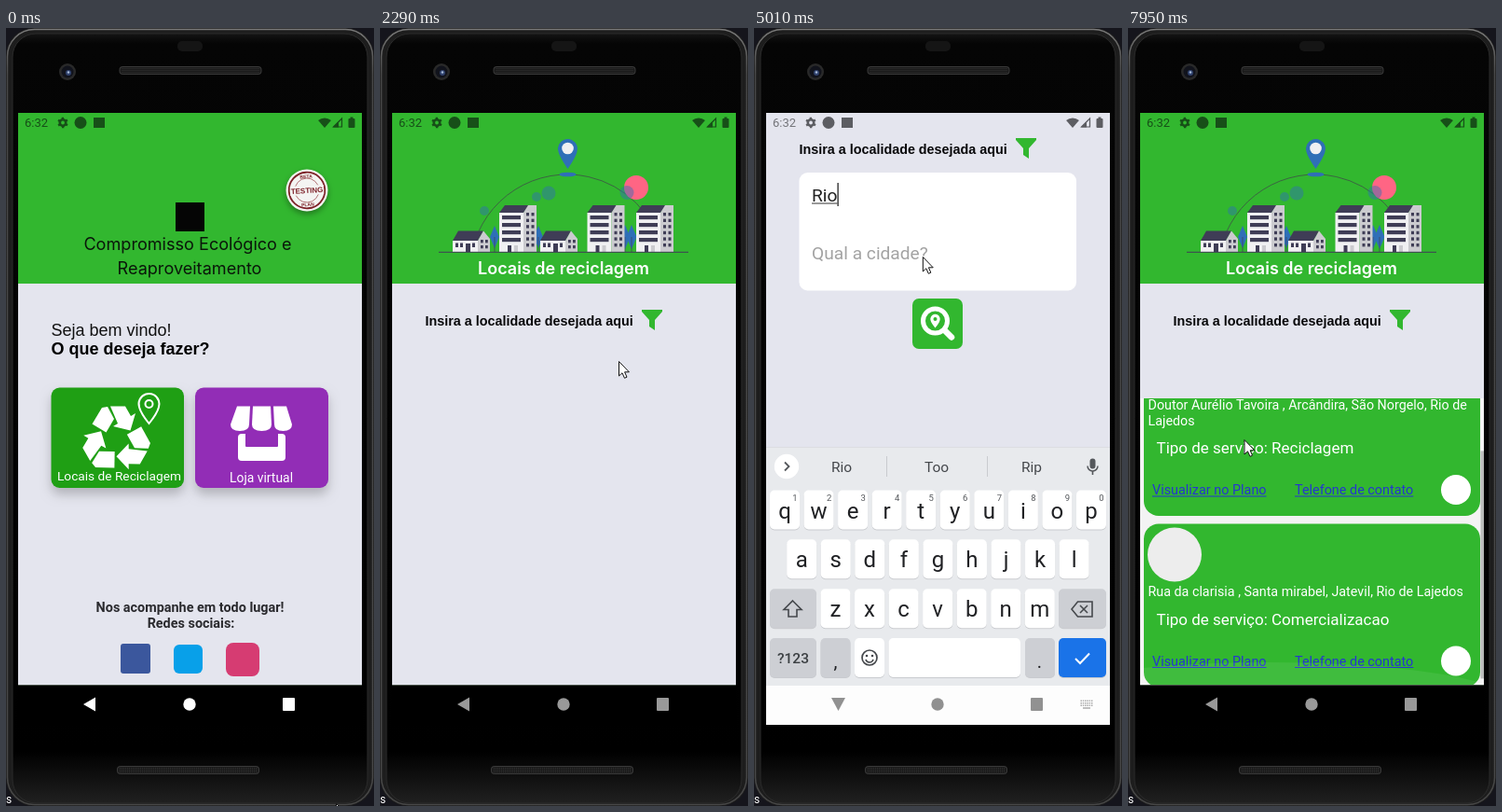
Animation of 395x834 px, one loop 8000 ms. Source, as an HTML page with a canvas:

```html
<!DOCTYPE html>
<html lang="pt">
<head>
<meta charset="utf-8">
<title>Aplicativo de reciclagem</title>
<style>
html, body { margin: 0; width: 100%; height: 100%; overflow: hidden; background: #14141a; }
canvas { display: block; width: 395px; height: 834px; }
</style>
</head>
<body>
<canvas id="stage"></canvas>
<script>
const W = 395, H = 834, LOOP = 8000;
const canvas = document.getElementById('stage');
const dpr = window.devicePixelRatio || 1;
canvas.width = W * dpr;
canvas.height = H * dpr;
const c = canvas.getContext('2d');

const GREEN = '#32b72f', PAGE = '#e4e5ee', DARK = '#3f3d56', BLUE = '#2f6fb7';
const SCREEN = { x: 13, y: 91, w: 369, h: 613 };
const ROBOTO = 'Roboto, sans-serif', ARIMO = '"Liberation Sans", Arial, sans-serif', INTER = 'Inter, sans-serif';

const clamp = (v, a = 0, b = 1) => Math.min(b, Math.max(a, v));
const mix = (a, b, p) => a + (b - a) * p;
const part = (t, a, b) => clamp((t - a) / (b - a));
const easeOut = p => 1 - (1 - p) ** 2;
const easeInOut = p => p * p * (3 - 2 * p);

// y of a cubic bezier easing at the given x
function bezier(x, x1, y1, x2, y2) {
  const at = (s, a, b) => 3 * (1 - s) ** 2 * s * a + 3 * (1 - s) * s * s * b + s ** 3;
  let lo = 0, hi = 1;
  for (let i = 0; i < 24; i++) {
    const mid = (lo + hi) / 2;
    if (at(mid, x1, x2) < x) lo = mid; else hi = mid;
  }
  return at(lo, y1, y2);
}

function rect(x, y, w, h, fill, r = 0) {
  c.fillStyle = fill;
  c.beginPath();
  c.roundRect(x, y, w, h, r);
  c.fill();
}
function disc(x, y, r, fill, ry = r) {
  c.fillStyle = fill;
  c.beginPath();
  c.ellipse(x, y, r, ry, 0, 0, 7);
  c.fill();
}
function ring(x, y, r, color, width) {
  c.strokeStyle = color;
  c.lineWidth = width;
  c.beginPath();
  c.arc(x, y, r, 0, 7);
  c.stroke();
}
function trace(points, close) {
  c.beginPath();
  for (let i = 0; i < points.length; i += 2) c.lineTo(points[i], points[i + 1]);
  if (close) c.closePath();
}
function poly(points, fill) {
  trace(points, true);
  c.fillStyle = fill;
  c.fill();
}
function line(points, color, width, close = false) {
  trace(points, close);
  c.strokeStyle = color;
  c.lineWidth = width;
  c.stroke();
}
function text(s, x, y, font, color, align = 'left') {
  c.font = font;
  c.fillStyle = color;
  c.textAlign = align;
  c.fillText(s, x, y);
}
function group(draw) {
  c.save();
  draw();
  c.restore();
}
function clip(x, y, w, h) {
  c.beginPath();
  c.rect(x, y, w, h);
  c.clip();
}
function shadow(color, blur, dy) {
  c.shadowColor = color;
  c.shadowBlur = blur * dpr;
  c.shadowOffsetY = dy * dpr;
}

// Opacity of a pressed button: fades down, then back up
const press = (t, start, mid, end) =>
  t < start ? 1 : t < mid ? mix(1, 0.3, part(t, start, mid)) : mix(0.3, 1, part(t, mid, end));

function speaker(x, y) {
  rect(x, y, 153, 9, '#3a3a3a', 4);
  rect(x + 1, y + 1, 151, 7, '#1a1a1a', 3);
  c.setLineDash([1, 1]);
  for (let i = 2; i < 8; i += 2) line([x + 3, y + i + 0.5, x + 150, y + i + 0.5], '#343434', 1);
  c.setLineDash([]);
}

function phone() {
  rect(0, 0, W, H, '#15151c');
  rect(0, 0, W, H, '#1d1d1d', 30);
  const rim = c.createLinearGradient(0, 0, 0, H);
  rim.addColorStop(0, '#7c7c7c');
  rim.addColorStop(0.06, '#474747');
  rim.addColorStop(1, '#474747');
  c.strokeStyle = rim;
  c.lineWidth = 1.5;
  c.beginPath();
  c.roundRect(1.5, 1.5, W - 3, H - 3, 29);
  c.stroke();
  const body = c.createLinearGradient(0, 0, 0, H);
  body.addColorStop(0, '#1c1c1c');
  body.addColorStop(0.02, '#050505');
  body.addColorStop(0.93, '#000');
  body.addColorStop(1, '#222');
  rect(7, 6, W - 14, H - 9, body, 25);
  c.strokeStyle = '#2b2b2b';
  c.lineWidth = 1;
  c.stroke();
  rect(184, 14, 27, 11, '#151515', 5);
  speaker(121.5, 41);
  speaker(119, 791);
  disc(66, 47, 9, '#292929');
  disc(66, 47, 6.5, '#11131c');
  disc(67, 48, 3, '#31436e');
  disc(67, 47.5, 1.2, '#a9bddb');
  text('s', 0, 831, '12px ' + ROBOTO, '#fff');
  rect(SCREEN.x, SCREEN.y, SCREEN.w, 656, '#000');
  rect(SCREEN.x, SCREEN.y + SCREEN.h, SCREEN.w, 1, '#465046');
}

function statusBar(light) {
  const ink = light ? '#5c5d62' : '#174f18';
  text('6:32', 20, 106, '13px ' + ROBOTO, light ? '#74757a' : ink);
  ring(61, 101.5, 3.2, ink, 2.6);
  for (let i = 0; i < 6; i++) {
    const a = i * Math.PI / 3 + 0.5, x = Math.cos(a), y = Math.sin(a);
    line([61 + x * 3.5, 101.5 + y * 3.5, 61 + x * 5.7, 101.5 + y * 5.7], ink, 2.4);
  }
  disc(80, 101.5, 6.5, ink);
  rect(94, 96, 12, 11, ink);
  c.fillStyle = ink;
  c.beginPath();
  c.moveTo(342, 107);
  c.arc(342, 107, 10.5, -Math.PI * 0.73, -Math.PI * 0.27);
  c.fill();
  line([351.5, 106, 360.5, 97, 360.5, 106], ink, 1.2, true);
  poly([351, 106.5, 357, 100.5, 357, 106.5], ink);
  rect(367.5, 97, 7, 10, ink, 1);
  rect(369.5, 95.5, 3, 2, ink);
}

function navBar(t, keys) {
  const level = Math.round(keys ? 145 : mix(255, 153, easeOut(part(t, 1290, 1900))));
  const ink = `rgb(${level},${level},${level})`;
  if (keys) rect(13, 705, 369, 42, '#fdfdfd');
  if (keys && t > 4010) poly([83, 718, 98, 718, 90.5, 732], ink);
  else poly([83, 725, 96, 717.5, 96, 732.5], ink);
  disc(197, 725, 6.7, ink);
  rect(297, 718, 13, 14, ink, 1);
  if (t >= 3550 && t < 6560) {
    for (let y = 0; y < 3; y++)
      for (let x = 0; x < 6; x++) rect(350.5 + x * 2.3, 720.5 + y * 2.5, 1.4, 1.4, '#a5a5a5');
    rect(353, 728.3, 8, 1.4, '#a5a5a5');
  }
}

function recycle(x, y) {
  group(() => {
    c.translate(x, y);
    for (let i = 0; i < 3; i++) {
      poly([-25.5, -16.6, -15, -34, -9, -35, -2, -22, -10.5, -7.6], '#fff');
      poly([-6, -35.5, 10, -35.5, 16, -25, 21, -28, 15.5, -9.5, -3, -14, 2, -17], '#fff');
      c.rotate(Math.PI * 2 / 3);
    }
  });
}

// Map pin: head centre, head radius, distance to the tip
function pinPath(x, y, r, tip) {
  c.beginPath();
  c.arc(x, y, r, Math.PI * 0.9, Math.PI * 0.1);
  c.quadraticCurveTo(x + r * 0.8, y + r * 0.9, x, y + tip);
  c.quadraticCurveTo(x - r * 0.8, y + r * 0.9, x - r * 0.95, y + r * 0.31);
  c.closePath();
}

function shop() {
  for (const [a, b, d, e] of [[248, 262, 241, 261], [265, 284, 264, 285], [287, 301, 288, 307]]) {
    c.fillStyle = '#fff';
    c.beginPath();
    c.moveTo(a, 405.5);
    c.lineTo(b, 405.5);
    c.lineTo(e, 425);
    c.quadraticCurveTo(e, 432, (d + e) / 2, 432);
    c.quadraticCurveTo(d, 432, d, 425);
    c.fill();
  }
  rect(249, 435, 51, 29, '#fff', 4);
  rect(257, 433, 35, 16, '#922db6', 1);
}

function stamp() {
  group(() => {
    shadow('rgba(0,0,0,.35)', 6, 3);
    disc(323, 174, 22.5, '#f4f4f2');
  });
  group(() => {
    c.translate(323, 174);
    c.rotate(-0.06);
    const ink = '#7d2128';
    ring(0, 0, 19.3, ink, 1.8);
    ring(0, 0, 13, '#a4585c', 0.8);
    rect(-18, -5, 36, 10, '#f4f4f2');
    text('TESTING', 0, 3, 'bold 8px ' + ARIMO, ink, 'center');
    text('BETA', 0, -13, 'bold 5px ' + ARIMO, ink, 'center');
    text('PLAN', 0, 17, 'bold 5px ' + ARIMO, ink, 'center');
  });
}

function homeScreen(t) {
  const title = '18.1px ' + INTER;
  rect(13, 91, 369, 640, PAGE);
  rect(13, 80, 369, 194, GREEN);
  rect(182, 187, 31, 31, '#050505');
  text('Compromisso Ecológico e', 195, 238, title, '#0a160a', 'center');
  text('Reaproveitamento', 197, 263.5, title, '#0a160a', 'center');
  stamp();
  text('Seja bem vindo!', 48.5, 330, '18px ' + ARIMO, '#111');
  text('O que deseja fazer?', 48.5, 350, 'bold 18px ' + ARIMO, '#000');

  group(() => {
    c.globalAlpha = press(t, 990, 1140, 1370);
    group(() => {
      shadow('rgba(0,0,0,.22)', 12, 7);
      rect(48.5, 385.5, 142.5, 107.5, '#1f9f14', 9);
    });
    recycle(118, 441);
    pinPath(153.5, 403, 11, 21);
    c.fillStyle = '#1f9f14';
    c.fill();
    c.strokeStyle = '#fff';
    c.lineWidth = 2;
    c.stroke();
    ring(153.5, 403, 4, '#fff', 2);
    text('Locais de Reciclagem', 121.5, 485, '13.7px ' + ROBOTO, '#fff', 'center');
  });
  group(() => {
    shadow('rgba(0,0,0,.22)', 12, 7);
    rect(203, 385.5, 143, 107.5, '#922db6', 9);
  });
  shop();
  text('Loja virtual', 274, 487, '13.9px ' + ROBOTO, '#fff', 'center');

  text('Nos acompanhe em todo lugar!', 197.5, 625.5, 'bold 14.4px ' + ROBOTO, '#2a2a2e', 'center');
  text('Redes sociais:', 198.5, 642.5, 'bold 14.4px ' + ROBOTO, '#2a2a2e', 'center');
  rect(123, 660, 32, 32, '#3b579d', 3);
  rect(180, 661, 31, 31, '#08a0e9', 6);
  rect(236, 659, 36, 36, '#d63c72', 8);
}

function tower(x) {
  poly([x, 198, x + 6, 190, x + 32, 190, x + 26, 198], DARK);
  rect(x, 198, 26, 42, '#f0f0f2');
  poly([x + 26, 198, x + 31, 190, x + 40, 190, x + 40, 240, x + 26, 240], '#cbcbcf');
  for (let i = 0; i < 4; i++) rect(x + 3, 201 + i * 8, 20, 4.2, DARK);
  rect(x + 9, 233, 4, 7, DARK);
  rect(x + 16, 233, 4, 7, '#cbcbcf');
  for (let i = 0; i < 6; i++)
    for (const dx of [29, 34.5]) rect(x + dx, 198 + i * 6.6, 3, 3.4, DARK);
}

function house(x) {
  poly([x, 228, x + 6, 217.5, x + 33, 217.5, x + 27, 228], DARK);
  rect(x, 228, 28, 12, '#f0f0f2');
  poly([x + 27, 228, x + 33, 217.5, x + 40, 226, x + 40, 240, x + 27, 240], '#cbcbcf');
  for (const dx of [3, 8, 21]) rect(x + dx, 230.5, 3, 4.5, DARK);
  rect(x + 14, 231, 5, 9, DARK);
  for (const dx of [30, 35])
    for (const y of [227, 233]) rect(x + dx, y, 2.8, 3.3, DARK);
}

function leaf(x, w, h) {
  poly([x, 224 - h, x + w, 224, x, 224 + h, x - w, 224], BLUE);
  line([x, 224, x, 240], DARK, 0.7);
}

function cityHeader() {
  rect(13, 91, 369, 183, GREEN);
  c.strokeStyle = '#3d5c45';
  c.lineWidth = 0.9;
  c.beginPath();
  c.arc(201, 261.6, 104.6, Math.PI * 1.07, Math.PI * 1.93);
  c.stroke();
  disc(275, 171, 13, '#ff6584');
  for (const [x, y, r] of [[112, 196, 5], [168, 181, 5], [181, 177, 7.5], [265, 176.5, 7.5]])
    disc(x, y, r, 'rgba(47,111,183,.45)');
  disc(201.5, 157, 9, BLUE, 2.3);
  pinPath(201.5, 129.5, 10.5, 21.5);
  c.fillStyle = BLUE;
  c.fill();
  disc(201.5, 129, 6.3, '#f0f0f2');
  leaf(123, 5, 12);
  leaf(170, 5, 12);
  leaf(263, 5.5, 13);
  leaf(270, 5.5, 13);
  house(78);
  tower(128);
  house(172);
  tower(222.5);
  tower(275);
  line([63, 240.3, 331, 240.3], DARK, 1);
  text('Locais de reciclagem', 197, 264, '600 18px ' + INTER, '#fff', 'center');
}

function prompt(y, alpha) {
  text('Insira a localidade desejada aqui', 48.5, y + 5.5, 'bold 14.35px ' + ARIMO, '#08080a');
  group(() => {
    c.globalAlpha = alpha;
    poly([281, y - 11, 303, y - 11, 303, y - 9, 295, y, 295, y + 11, 289, y + 7, 289, y, 281, y - 9], GREEN);
  });
}

function typed(t) {
  return t < 3810 ? '' : t < 4540 ? 'R' : t < 4750 ? 'Ri' : 'Rio';
}

function caretOn(t) {
  const last = [4750, 4540, 3810, 3550].find(k => t >= k);
  return last !== undefined && Math.floor((t - last) / 503) % 2 === 0;
}

function searchForm(t) {
  const font = '19.2px ' + ROBOTO, word = typed(t);
  rect(48.5, 155, 297.5, 126.5, '#fff', 9);
  text(word || 'Qual o estado?', 62, 185.5, font, word ? '#222' : '#a3a3a3');
  const end = 62 + (word ? c.measureText(word).width : 0);
  if (word && t > 4010) rect(62, 187.5, end - 62, 1, '#333');
  if (caretOn(t)) rect(end, 166, 1.4, 25, '#333');
  text('Qual a cidade?', 62, 248, font, '#a3a3a3');

  group(() => {
    c.globalAlpha = press(t, 5710, 5830, 6010);
    rect(170, 290, 54, 54, GREEN, 7);
    ring(194.5, 314, 13, '#fff', 5);
    c.lineCap = 'round';
    line([205, 324.5, 212, 331.5], '#fff', 6.5);
    pinPath(194.5, 312, 5.2, 9.5);
    c.fillStyle = '#fff';
    c.fill();
    disc(194.5, 312, 2, GREEN);
  });
}

function key(x, y, w, fill = '#fff') {
  rect(x, y + 1, w, 42, '#c9cbcf', 5);
  rect(x, y, w, 42, fill, 5);
}

function toolbar(t) {
  const ink = '#55585c', word = typed(t), words = t > 4010;
  disc(35, 470, 13.2, '#fff');
  const s = words ? 1 : -1;
  line([35 - s * 2, 465.5, 35 + s * 2.5, 470, 35 - s * 2, 474.5], ink, 1.8);
  rect(360.5, 461.5, 6, 11, ink, 3);
  c.strokeStyle = ink;
  c.lineWidth = 1.5;
  c.beginPath();
  c.arc(363.5, 469.5, 5.5, 0, Math.PI);
  c.stroke();
  line([363.5, 475, 363.5, 479], ink, 1.6);
  if (words) {
    const options = { R: ['R', 'Rs', 'Rua'], Ri: ['Ri', 'Too', 'Rio'], Rio: ['Rio', 'Too', 'Rip'] }[word];
    options.forEach((w, i) => text(w, 94 + i * 102, 476, '15.5px ' + ROBOTO, '#44474b', 'center'));
    for (const x of [142, 250]) rect(x, 459, 1, 22, '#c9cbcf');
    return;
  }
  ring(83, 468.5, 4.6, ink, 1.8);
  line([86.5, 472, 92, 477.5], ink, 2);
  line([131, 463.5, 144, 463.5, 144, 472, 139, 477, 131, 477], ink, 1.6, true);
  line([139, 477, 139, 472, 144, 472], ink, 1.3);
  rect(134, 467, 2, 2, ink);
  rect(139, 467, 2, 2, ink);
  line([134.5, 471, 136, 472.5, 138, 472], ink, 1.2);
  text('GIF', 190, 474, 'bold 11.5px ' + ROBOTO, ink, 'center');
  line([238, 464, 251, 464, 251, 478, 238, 478], ink, 1.6, true);
  rect(241, 462, 7, 4, ink);
  for (const y of [469, 472, 475]) line([241, y, 248, y], ink, 1.1);
  rect(276.5, 459, 1, 22, '#d0d2d6');
  for (const x of [304, 310, 316]) disc(x, 470.5, 1.6, ink);
}

function keyboard(t) {
  const upper = t <= 4010, ink = '#202124', grey = '#cdcfd4', step = 36.55;
  rect(13, 449, 369, 256, '#e8eaed');
  rect(13, 449, 369, 1, '#dcdde2');
  toolbar(t);
  const rows = [['qwertyuiop', 17, 495.5], ['asdfghjkl', 35.2, 548.3], ['zxcvbnm', 71.5, 601.2]];
  rows.forEach(([letters, x0, y], row) => [...letters].forEach((ch, i) => {
    const x = x0 + i * step;
    key(x, y, 32);
    text(upper ? ch.toUpperCase() : ch, x + 16, y + 30, '24px ' + ROBOTO, ink, 'center');
    if (row === 0) text((i + 1) % 10, x + 27, y + 11, '9.5px ' + ROBOTO, '#55585c', 'center');
  }));

  key(17, 601.2, 50, grey);
  const arrow = [41.5, 614, 51, 623.5, 46, 623.5, 46, 631, 37, 631, 37, 623.5, 32, 623.5];
  if (upper) poly(arrow, '#45484c');
  else line(arrow, '#45484c', 1.6, true);
  key(327, 601.2, 51, grey);
  line([341, 623, 347.5, 615, 363, 615, 363, 631, 347.5, 631], '#45484c', 1.6, true);
  line([350, 619, 358, 627], '#45484c', 1.6);
  line([358, 619, 350, 627], '#45484c', 1.6);

  const y = 654;
  key(17, y, 50, grey);
  text('?123', 42, 681, '500 15.5px ' + ROBOTO, '#3c4043', 'center');
  key(71.5, y, 32, grey);
  text(',', 87.5, 686, '20px ' + ROBOTO, ink, 'center');
  key(108, y, 32);
  ring(124, 675, 8, '#45484c', 1.7);
  disc(121, 673, 1.3, '#45484c');
  disc(127, 673, 1.3, '#45484c');
  c.beginPath();
  c.arc(124, 676, 4, 0.2, 2.94);
  c.stroke();
  key(144.5, y, 141.5);
  key(291, y, 32, grey);
  text('.', 306.5, 686, '20px ' + ROBOTO, ink, 'center');
  key(327, y, 51, '#1a73e8');
  line([345, 676, 350, 681, 360, 670.5], '#fff', 2);
}

function link(s, x, y) {
  text(s, x, y, '14.4px ' + ROBOTO, '#2536cf');
  rect(x, y + 1.5, c.measureText(s).width, 1, '#2536cf');
}

function placeCard(top, address, service) {
  const extra = (address.length - 1) * 17;
  rect(17, top, 361, 175 + extra, GREEN, 16);
  disc(50, top + 33, 29, '#ededed');
  address.forEach((s, i) => text(s, 21.5, top + 77.5 + i * 17, '14.3px ' + ROBOTO, '#fff'));
  const y = top + extra;
  text('Tipo de serviço: ' + service, 30.5, y + 108, '17px ' + ROBOTO, '#fff');
  link('Visualizar no Plano', 26, y + 152);
  link('Telefone de contato', 179, y + 152);
  disc(352, y + 147, 16, '#fff');
}

function results(t) {
  const scroll = 70.5 * easeInOut(part(t, 7560, 7930));
  group(() => {
    clip(13, 397, 369, 307);
    rect(13, 397, 369, 307, '#f3f3f3');
    placeCard(401.5 - scroll, ['Doutor Aurélio Tavoira , Arcândira, São Norgelo, Rio de', 'Lajedos'], 'Reciclagem');
    placeCard(602 - scroll, ['Rua da clarisia , Santa mirabel, Jatevil, Rio de Lajedos'], 'Comercializacao');
    rect(378.5, 397 + scroll * 0.8, 3.5, 244, '#b9bbb9');
    const glow = part(t, 7820, 7950);
    if (glow) disc(150, 722, 260, `rgba(255,255,255,${0.07 * glow})`, 42 * glow);
  });
}

function placesScreen(t) {
  rect(13, 91, 369, 613, PAGE);
  if (t >= 2990 && t < 6560) {
    prompt(129, 1);
    searchForm(t);
    return;
  }
  cityHeader();
  prompt(313, press(t, 2840, 2960, 3200));
  if (t >= 6640) results(t);
}

function app(t) {
  const p = t < 1374 ? 0 : bezier(part(t, 1374, 1799), 0.20833, 0.82, 0.25, 1);
  const h = SCREEN.h;
  group(() => {
    clip(SCREEN.x, SCREEN.y, SCREEN.w, h);
    if (p < 1) group(() => {
      c.translate(0, -0.02 * h * p);
      homeScreen(t);
    });
    if (p > 0) {
      if (p < 1) rect(SCREEN.x, SCREEN.y, SCREEN.w, h, `rgba(0,0,0,${0.1 * clamp(p / 0.36)})`);
      const edge = h * (1 - p);
      clip(SCREEN.x, SCREEN.y + edge, SCREEN.w, h);
      c.translate(0, edge * (1 - 0.959));
      placesScreen(t);
    }
  });
  statusBar(t >= 2990 && t < 6560);

  const keys = t >= 3770 && t < 6560;
  if (keys) group(() => {
    clip(SCREEN.x, SCREEN.y, SCREEN.w, 614);
    c.translate(0, 256 * (1 - easeOut(part(t, 3770, 3880))));
    keyboard(t);
  });
  navBar(t, keys);
}

// time, x, y of the pointer tip
const PATH = [
  [70, 354, 831], [670, 116, 479], [1150, 116, 479], [1450, 123, 531], [1830, 125, 528],
  [2290, 256, 357], [2610, 289, 309], [2990, 289, 309], [3300, 150, 177], [4800, 150, 177],
  [5250, 218, 327], [5400, 219, 327], [5480, 216.5, 326], [6560, 216.5, 326], [6720, 214, 331],
  [7330, 82, 532], [7410, 82, 530], [7560, 82, 530], [7930, 124.5, 441]
];

function pointer(t) {
  const i = PATH.findIndex(k => k[0] > t);
  const b = PATH[i < 0 ? PATH.length - 1 : i], a = i > 0 ? PATH[i - 1] : b;
  const p = a === b ? 0 : easeInOut(part(t, a[0], b[0]));
  group(() => {
    c.translate(mix(a[1], b[1], p), mix(a[2], b[2], p));
    const shape = [0.5, 0.5, 0.5, 16, 4, 12.8, 6.5, 18.3, 9, 17.2, 6.6, 11.8, 11.4, 11.8];
    poly(shape, '#fff');
    line(shape, '#111', 1, true);
  });
}

function draw(t) {
  c.setTransform(dpr, 0, 0, dpr, 0, 0);
  phone();
  app(t);
  pointer(t);
}

const start = performance.now();
function tick() {
  draw((performance.now() - start) % LOOP);
  requestAnimationFrame(tick);
}
tick();
</script>
</body>
</html>
```
